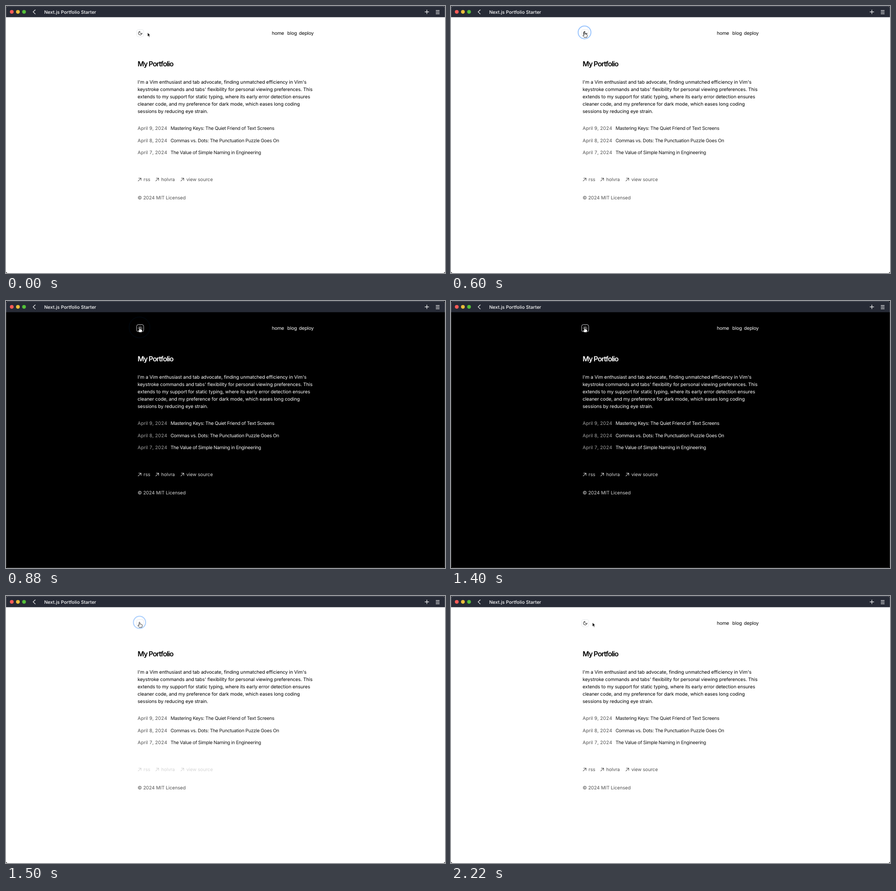
Animation, 959 px wide and 584 px high, one loop 2.24 s. Source, as an HTML page:

```html
<!DOCTYPE html>
<html lang="en">
<head>
<meta charset="utf-8">
<title>My Portfolio</title>
<style>
  html, body { margin: 0; width: 100%; height: 100%; overflow: hidden; background: #000; }
  svg { display: block; width: 959px; height: 584px; }
  text {
    font: 400 10.3px Inter, Roboto, sans-serif;
    letter-spacing: -.072px;
    text-rendering: geometricPrecision;
    white-space: pre;
  }
  svg {
    --page: #fff; --ink: #000; --title: #171717; --date: #525252;
    --note: #525252; --nav: #000; --link: #525252;
  }
  svg.dark {
    --page: #000; --ink: #fff; --title: #f5f5f5; --date: #a3a3a3; --note: #d4d4d4;
  }
  .page { fill: var(--page); }
  .ink { fill: var(--ink); }
  .head { fill: var(--ink); font-size: 15.4px; font-weight: 600; letter-spacing: -1.02px; }
  .title { fill: var(--title); letter-spacing: -.3px; }
  .date { fill: var(--date); letter-spacing: .06px; font-variant-numeric: tabular-nums; }
  .note { fill: var(--note); }
  .nav { fill: var(--nav); letter-spacing: -.12px; }
  .link { fill: var(--link); }
  .bar { fill: #fff; font-size: 10px; font-weight: 500; letter-spacing: .085px; }
  .line { fill: none; stroke: #fff; stroke-width: 1.15; stroke-linecap: round; stroke-linejoin: round; }
  .icon { fill: none; stroke: var(--nav); stroke-width: 2; stroke-linecap: round; stroke-linejoin: round; }
  .out { fill: none; stroke: var(--link); stroke-width: 1.05; }
  #sun, .dark #moon { display: none; }
  .dark #sun { display: inline; }
</style>
</head>
<body>
<svg id="stage" viewBox="0 0 959 584">
  <clipPath id="frame"><rect width="959" height="584" rx="4"/></clipPath>
  <g clip-path="url(#frame)">
    <rect class="page" width="959" height="584"/>
    <rect width="959" height="24.5" fill="#272b36"/>
    <rect x=".5" y="1" width="958" height="582.5" rx="3.5" fill="none" stroke="#fff" stroke-opacity=".2"/>
  </g>

  <circle cx="12.6" cy="12.8" r="4.1" fill="#fc5b57"/>
  <circle cx="26" cy="12.8" r="4.1" fill="#e9bd3a"/>
  <circle cx="39.4" cy="12.8" r="4.1" fill="#53c038"/>
  <path class="line" d="M63.9 8.5L59.2 12.9L63.9 17.3M915.2 12.8H923.6M919.4 8.6V17"/>
  <path class="line" d="M939.4 9.9H946.6M939.4 13.4H946.6M939.4 16.9H946.6"/>

  <g id="copy"></g>

  <rect x="285.4" y="51.6" width="15.4" height="15.6" rx="3.8" fill="none" stroke="#e5e7eb" stroke-width=".9"/>
  <g class="icon" transform="translate(293.1 59.4) scale(.44) translate(-12 -12)">
    <path id="moon" d="M21 12.8A9 9 0 1 1 11.2 3A7 7 0 0 0 21 12.8Z"/>
    <g id="sun"><circle cx="12" cy="12" r="4"/><path id="rays"/></g>
  </g>

  <circle id="ring" cx="291.7" cy="57.7" fill="none" stroke="#1478fa" stroke-width="2"/>
  <g id="cursor">
    <path id="arrow" fill="#000" stroke="#fff" stroke-width=".8"
      d="M0 0V9L2 7.1L3.4 10.3L4.9 9.7L3.5 6.5H6.2Z"/>
    <path id="hand" fill="#fff" stroke="#000" stroke-width=".8" stroke-linejoin="round"
      d="M-1 1C-1-.8 1-.8 1 1V4.3C1.2 3.6 2.7 3.6 2.8 4.6C3.2 4 4.4 4.2 4.5 5.2C5 4.7 6 5 6 6V8C6 9.5 5 10 5 11.3H-.6C-.8 10.2-3 8.6-3.4 7.2C-3.6 6.2-2.3 5.9-1.6 6.8L-1 7.5Z"/>
  </g>
</svg>
<script>
const LOOP = 2240, FADE = 150, RIPPLE = 400;
const toDark = 620, toLight = 1500, clicks = [480, 1400];
const rest = [309.2, 58], target = [291.6, 57.4];

const $ = id => document.getElementById(id);
const svg = $('stage'), ring = $('ring'), cursor = $('cursor');
const clamp = v => Math.min(1, Math.max(0, v));
const mix = (a, b, k) => a + (b - a) * k;

function add(tag, attrs, text = '') {
  const el = document.createElementNS('http://www.w3.org/2000/svg', tag);
  for (const name in attrs) el.setAttribute(name, attrs[name]);
  el.textContent = text;
  $('copy').append(el);
}
const write = (cls, x, y, text) => add('text', { class: cls, x, y }, text);

write('bar', 83.4, 16.8, 'Next.js Portfolio Starter');
write('nav', 580.7, 63.4, 'home');
write('nav', 614.6, 63.4, 'blog');
write('nav', 640.1, 63.4, 'deploy');
write('head', 287.4, 132, 'My Portfolio');

[
  "I'm a Vim enthusiast and tab advocate, finding unmatched efficiency in Vim's",
  "keystroke commands and tabs' flexibility for personal viewing preferences. This",
  'extends to my support for static typing, where its early error detection ensures',
  'cleaner code, and my preference for dark mode, which eases long coding',
  'sessions by reducing eye strain.'
].forEach((line, i) => write('ink', 287.5, 169.8 + 16 * i, line));

[
  'Mastering Keys: The Quiet Friend of Text Screens',
  'Commas vs. Dots: The Punctuation Puzzle Goes On',
  'The Value of Simple Naming in Engineering'
].forEach((title, i) => {
  const y = 270.9 + 26.67 * i;
  write('date', 287.5, y, `April ${9 - i}, 2024`);
  write('title', 359.4, y, title);
});

[[287.6, 'rss'], [326, 'holvra'], [380.9, 'view source']].forEach(([x, label]) => {
  add('path', { class: 'out', d: `M${x + .9} 383.1L${x + 7.3} 376.7M${x + 1.9} 376.4H${x + 7.5}V382` });
  write('link', x + 13, 382.8, label);
});
write('note', 287.5, 422.6, '\u00a9 2024 MIT Licensed');

let rays = '';
for (let i = 0; i < 8; i++) {
  const c = Math.cos(i * Math.PI / 4), s = Math.sin(i * Math.PI / 4);
  rays += `M${12 + 8 * c} ${12 + 8 * s}L${12 + 10 * c} ${12 + 10 * s}`;
}
$('rays').setAttribute('d', rays);

// CSS-style cubic-bezier easing, solved by bisection
function bezier(x1, y1, x2, y2) {
  const at = (a, b, u) => 3 * a * u * (1 - u) ** 2 + 3 * b * u * u * (1 - u) + u ** 3;
  return x => {
    let lo = 0, hi = 1;
    for (let i = 0; i < 20; i++) {
      const mid = (lo + hi) / 2;
      if (at(x1, x2, mid) < x) lo = mid; else hi = mid;
    }
    return at(y1, y2, lo);
  };
}
const fadeEase = bezier(.4, 0, .2, 1), moveEase = bezier(.42, 0, .58, 1);

const gray = v => `rgb(${v},${v},${v})`;

function theme(t) {
  const dark = t >= toDark - 8 && t < toLight - 8;
  const start = t < toLight - 8 ? toDark : toLight;
  const k = fadeEase(clamp((t - start) / FADE));
  const level = start === toDark ? k : 1 - k;
  svg.classList.toggle('dark', dark);
  svg.style.setProperty('--nav', gray(Math.round(mix(0, 255, level))));
  svg.style.setProperty('--link', gray(Math.round(mix(82, 212, level))));
}

function ripple(t) {
  const age = t - (t < clicks[1] ? clicks[0] : clicks[1]);
  const on = age >= 0 && age <= RIPPLE + 10;
  const peak = 130;
  const alpha = age < peak ? .46 * age / peak : mix(.46, .05, (age - peak) / (RIPPLE - peak));
  ring.setAttribute('r', Math.max(0, 10.2 + age / 32));
  ring.setAttribute('stroke-opacity', on ? clamp(alpha) : 0);
}

function pointer(t) {
  const k = t < 1500 ? moveEase(clamp(t / 400)) : 1 - moveEase(clamp((t - 1980) / 260));
  const x = mix(rest[0], target[0], k), y = mix(rest[1], target[1], k);
  const hover = x < 301;
  cursor.setAttribute('transform', `translate(${x} ${y})`);
  $('hand').style.display = hover ? '' : 'none';
  $('arrow').style.display = hover ? 'none' : '';
}

const begin = performance.now();
function draw() {
  const t = (performance.now() - begin) % LOOP;
  theme(t);
  ripple(t);
  pointer(t);
  requestAnimationFrame(draw);
}
draw();
</script>
</body>
</html>
```
